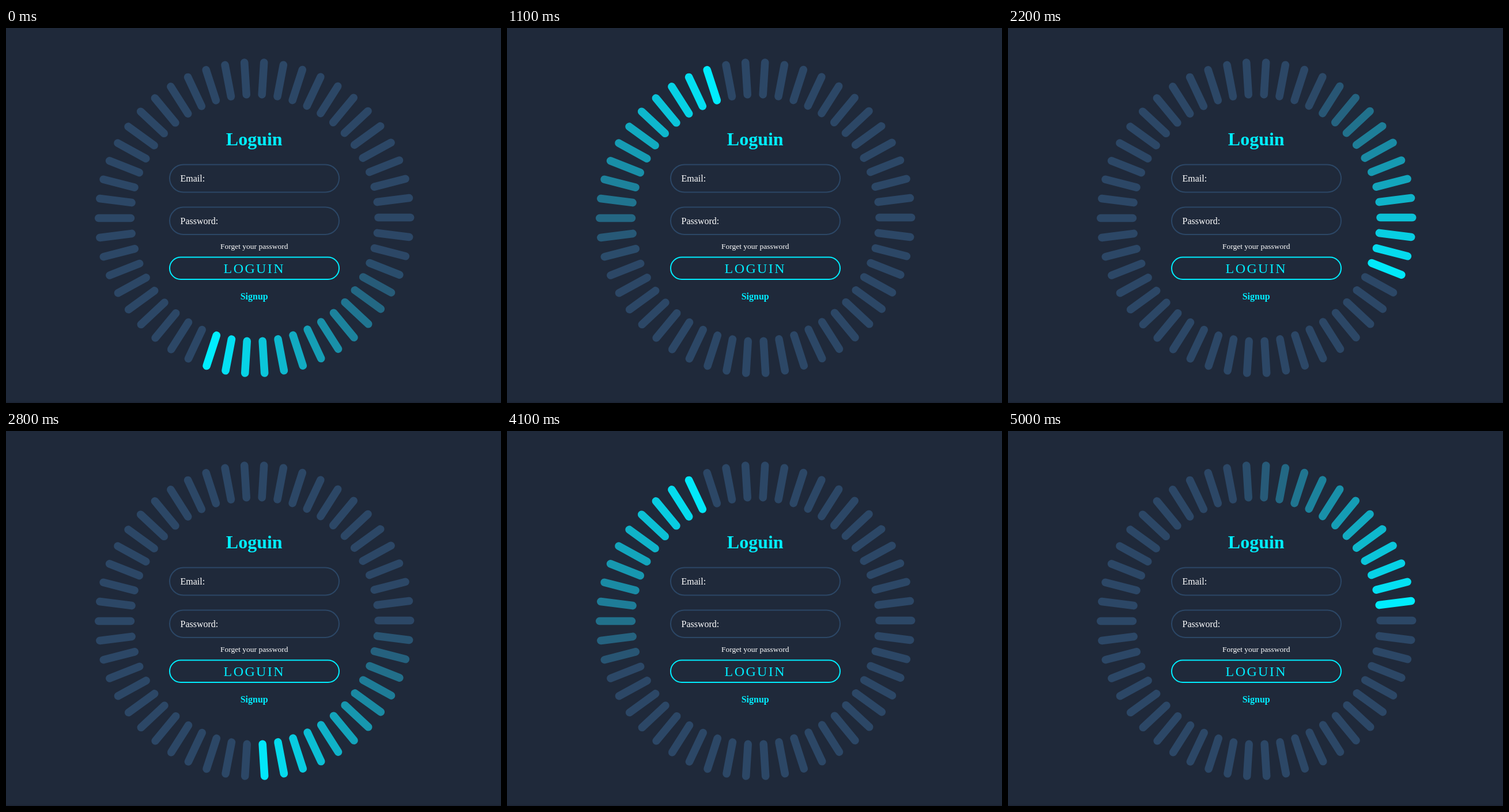
These frames come from a looping animation (859x652 px, 5.1 s). An HTML page with a canvas:

```html
<!DOCTYPE html>
<html lang="en">
<head>
<meta charset="utf-8">
<title>Login ring</title>
<style>
  html, body { margin: 0; width: 100%; height: 100%; overflow: hidden; background: #1f293a; }
  canvas, svg { position: absolute; left: 0; top: 0; display: block; }
  svg { font-family: "Liberation Serif", "Times New Roman", serif; font-size: 16px; fill: #fff; }
  rect { fill: none; stroke: #2c4766; stroke-width: 2; }
  .mid { text-anchor: middle; }
  .accent { fill: #0ef; }
  .bold { font-weight: bold; }
</style>
</head>
<body>
<canvas id="ring" width="859" height="652"></canvas>
<svg width="859" height="652" viewBox="0 0 859 652">
  <text class="mid accent bold" x="430.7" y="204" font-size="32">Loguin</text>
  <rect x="284" y="237.5" width="294" height="48" rx="24"/>
  <text x="302.5" y="266.5">Email:</text>
  <rect x="284" y="311.5" width="294" height="47.5" rx="23.75"/>
  <text x="302.5" y="340.5">Password:</text>
  <text class="mid" x="430.7" y="384" font-size="13.5">Forget your password</text>
  <rect x="284" y="398.5" width="294" height="38.5" rx="19.25" style="stroke:#0ef"/>
  <text class="accent" x="377.6" y="426" font-size="24" letter-spacing="2.4">LOGUIN</text>
  <text class="mid accent bold" x="430.7" y="471.5">Signup</text>
</svg>
<script>
const ctx = document.getElementById('ring').getContext('2d');
const LOOP = 5100, TICK = 100;
const BARS = 50, FADE = BARS / 4;
const HEAD_START = 40.02, BARS_PER_STEP = 1.827;
const HELD_TICKS = [13, 23, 34, 44];
const CENTER = { x: 431.2, y: 330 };
const OUTER = 277.3, INNER = 208, THICKNESS = 13.6, SIDE_SHIFT = -0.5;
const LIT = [0, 238, 255], DIM = [44, 71, 102];

function barColor(age) {
  const k = Math.min(age / FADE, 1);
  return `rgb(${LIT.map((c, i) => Math.round(c + (DIM[i] - c) * k))})`;
}

function drawBar(index, head) {
  const age = ((head - index) % BARS + BARS) % BARS;
  const cap = THICKNESS / 2;
  ctx.save();
  ctx.translate(CENTER.x, CENTER.y);
  ctx.rotate(index * 2 * Math.PI / BARS);
  ctx.strokeStyle = barColor(age);
  ctx.beginPath();
  ctx.moveTo(-OUTER + cap, -SIDE_SHIFT);
  ctx.lineTo(-INNER - cap, -SIDE_SHIFT);
  ctx.stroke();
  ctx.restore();
}

function draw(ms) {
  const tick = Math.floor((ms % LOOP) / TICK);
  // The sweep pauses for one tick at each held position.
  const step = tick - HELD_TICKS.filter(held => tick >= held).length;
  const head = HEAD_START + step * BARS_PER_STEP;
  ctx.fillStyle = '#1f293a';
  ctx.fillRect(0, 0, 859, 652);
  ctx.fillStyle = '#1c2434';
  ctx.fillRect(0, 650, 859, 2);
  ctx.lineWidth = THICKNESS;
  ctx.lineCap = 'round';
  for (let i = 0; i < BARS; i++) drawBar(i, head);
}

const start = performance.now();
function frame() {
  draw(performance.now() - start);
  requestAnimationFrame(frame);
}
frame();
</script>
</body>
</html>
```
